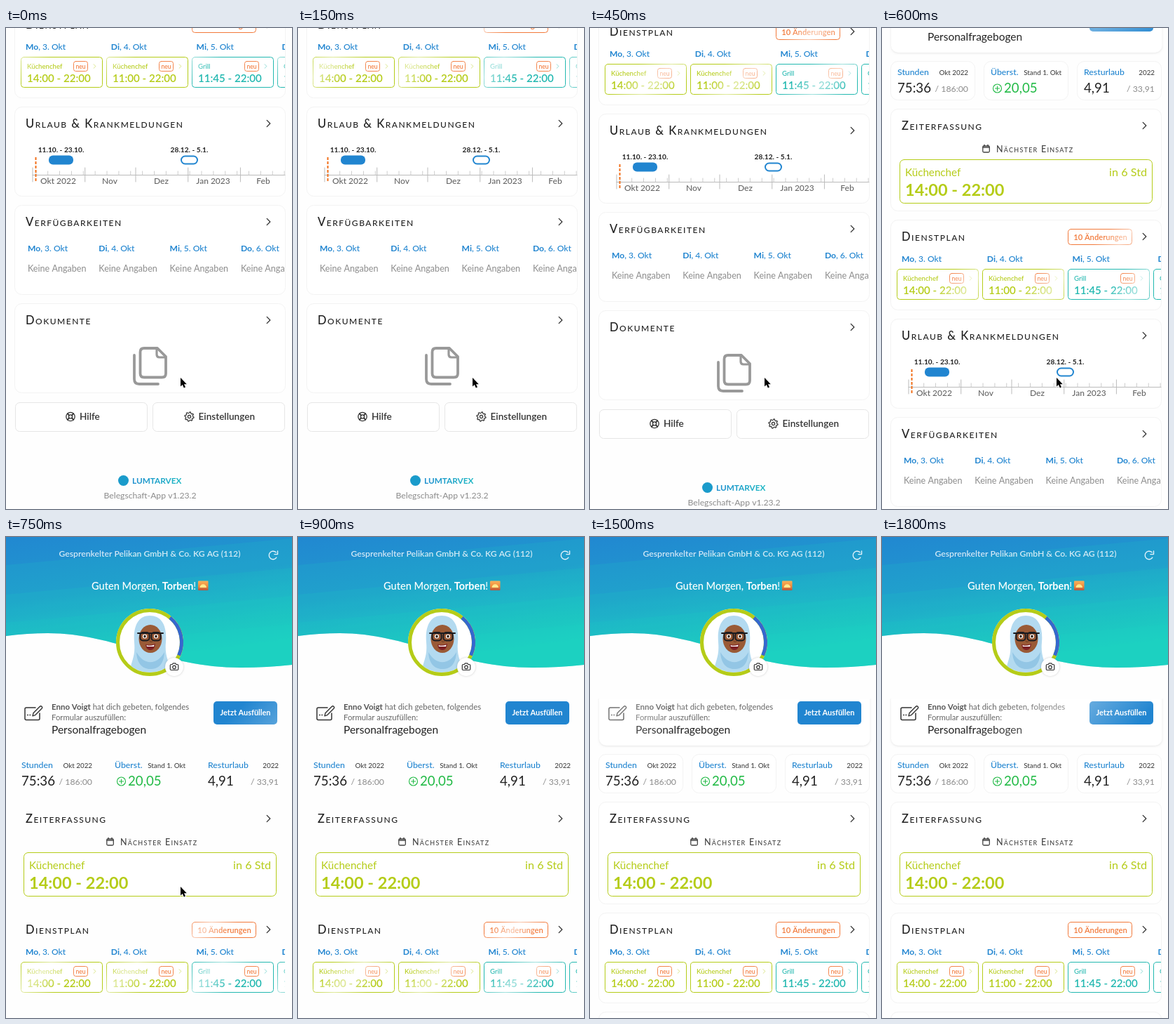
Recreate the animation shown at these times as an HTML page with a canvas. Size 408x685 px, loop 1900 ms.

```html
<!DOCTYPE html>
<html lang="de">
<head>
<meta charset="utf-8">
<title>Dienstplan</title>
<style>
  html, body { margin: 0; width: 100%; height: 100%; overflow: hidden; background: #fefefe; }
  canvas { display: block; width: 408px; height: 685px; }
</style>
</head>
<body>
<canvas id="stage"></canvas>
<script>
const W = 408, H = 685, LOOP = 1900, STEP = 150;
const BLUE = '#2185d0', LIME = '#b5cc18', TEAL = '#22b8b0', ORANGE = '#f2793a', GREEN = '#21ba45';
const DARK = '#222', GREY = '#8c8c8c';
const SCROLL = [564, 564, 564, 554, 262, 0];

const canvas = document.getElementById('stage');
const ctx = canvas.getContext('2d');
const dpr = window.devicePixelRatio || 1;
canvas.width = W * dpr;
canvas.height = H * dpr;

let time = 0, framed = true;

// y is the middle of the capital letters; returns the x where the text ends
function text(str, x, y, size, color, { weight = 400, align = 'left', spacing = 0, caps = '' } = {}) {
  ctx.font = `${caps} ${weight} ${size}px Lato, "Open Sans", sans-serif`;
  ctx.letterSpacing = spacing + 'px';
  ctx.textAlign = align;
  ctx.fillStyle = color;
  ctx.fillText(str, x, y + size * 0.36);
  return x + ctx.measureText(str).width;
}

function box(x, y, w, h, r, { fill, stroke, width = 1 } = {}) {
  ctx.beginPath();
  ctx.roundRect(x, y, w, h, r);
  if (fill) { ctx.fillStyle = fill; ctx.fill(); }
  if (stroke) { ctx.strokeStyle = stroke; ctx.lineWidth = width; ctx.stroke(); }
}

function line(d, color, width = 1) {
  ctx.strokeStyle = color;
  ctx.lineWidth = width;
  ctx.lineCap = ctx.lineJoin = 'round';
  ctx.stroke(new Path2D(d));
}

function shape(d, color) {
  ctx.fillStyle = color;
  ctx.fill(new Path2D(d));
}

function oval(x, y, rx, ry, color) {
  ctx.beginPath();
  ctx.ellipse(x, y, rx, ry, 0, 0, 7);
  ctx.fillStyle = color;
  ctx.fill();
}

function ring(x, y, r, color, width, from = 0, to = Math.PI * 2) {
  ctx.beginPath();
  ctx.arc(x, y, r, from, to);
  ctx.lineCap = 'butt';
  ctx.strokeStyle = color;
  ctx.lineWidth = width;
  ctx.stroke();
}

// fades a diagonal band at cx towards the background
function fade(x, y, w, h, cx, half, strength) {
  const cy = y + h / 2, d = half / 2;
  const g = ctx.createLinearGradient(cx - d, cy - d, cx + d, cy + d);
  g.addColorStop(0, 'rgba(255,255,255,0)');
  g.addColorStop(0.5, `rgba(255,255,255,${strength})`);
  g.addColorStop(1, 'rgba(255,255,255,0)');
  ctx.fillStyle = g;
  ctx.fillRect(x - 1, y - 1, w + 2, h + 2);
}

function shimmer(x, y, w, h) {
  const f = time < 750 ? 0.06 + (time - 150) * 0.0019 : 0.19 + (time - 750) * 0.0017;
  fade(x, y, w, h, x + f * w, w * 0.4, 0.58);
}

function card(x, y, w, h, r = 10) {
  if (framed) box(x + 0.5, y + 0.5, w - 1, h - 1, r, { fill: '#fff', stroke: '#f3f3f3' });
}

const chevron = (x, y, s, color, width) =>
  line(`M${x - s / 2} ${y - s}L${x + s / 2} ${y}L${x - s / 2} ${y + s}`, color, width);

function section(name, y, h) {
  card(12, y, 387, h);
  text(name, 28, y + 24.5, 16.5, DARK, { weight: 500, spacing: 1.5, caps: 'small-caps' });
  chevron(374.5, y + 24, 4.6, '#333', 1.3);
}

function day(name, date, x, y) {
  const end = text(name, x, y, 12.1, BLUE, { weight: 700 });
  text(`, ${date}. Okt`, end, y, 12.1, BLUE, { weight: 500 });
}

function clipRight(draw) {
  ctx.save();
  ctx.beginPath();
  ctx.rect(0, 0, 398, 1300);
  ctx.clip();
  draw();
  ctx.restore();
}

function header() {
  ctx.save();
  ctx.clip(new Path2D('M0 0H408V182Q372 186 335 186C225 186 155 137 60 137Q30 137 0 141Z'));
  const g = ctx.createLinearGradient(0, 0, 25, 195);
  g.addColorStop(0, '#2188d1');
  g.addColorStop(0.45, '#2199ce');
  g.addColorStop(1, '#1fcdc1');
  ctx.fillStyle = g;
  ctx.fillRect(0, 0, W, 200);
  for (const y of [40, 82, 122, 162])
    shape(`M0 ${y}L408 ${y - 38}V220H0Z`, 'rgba(29,209,191,0.12)');
  ctx.restore();

  text('Gesprenkelter Pelikan GmbH & Co. KG AG (112)', 205, 24, 12.2, 'rgba(255,255,255,0.8)',
    { weight: 600, align: 'center' });
  ring(381, 26, 5.8, '#e4f3fb', 1.4, 0.5, 5.6);
  line('M387.5 20V24.6H382.8', '#e4f3fb', 1.4);

  let x = text('Guten Morgen, ', 122, 69.5, 14.6, '#fff', { weight: 500 });
  x = text('Torben', x, 69.5, 14.4, '#fff', { weight: 700 });
  text('!', x, 69.5, 14.4, '#fff');
  const sky = ctx.createLinearGradient(0, 62, 0, 76);
  sky.addColorStop(0, '#f7b45c');
  sky.addColorStop(0.6, '#f08a3c');
  sky.addColorStop(1, '#b5533c');
  box(274, 62.5, 14.5, 13.5, 1, { fill: sky });
  shape('M276.5 72A4.7 4.7 0 0 1 286 72Z', '#ffe98c');
}

function avatar() {
  oval(205, 150, 48, 48, '#fff');
  ctx.save();
  ctx.beginPath();
  ctx.arc(205, 150, 43, 0, 7);
  ctx.clip();
  shape('M176 196C178 176 185 172 183 150C181 125 190 112 205 112C222 112 230 126 228 150C226 170 233 176 235 196Z', '#b3daf0');
  shape('M186 164C197 183 215 183 226 164C225 183 216 188 206 188C196 188 187 182 186 164Z', '#93c6e5');
  oval(206, 145, 16.5, 20, '#9a5a36');
  for (const ex of [198, 214]) {
    oval(ex, 141.5, 3, 3, '#fff');
    oval(ex, 141.5, 1.6, 1.9, '#2b1a12');
    box(ex - 6.6, 136, 13.2, 11.5, 4, { stroke: '#1c1c20', width: 2 });
  }
  line('M188 137H224', '#1c1c20', 2);
  line('M205 148Q207.5 151 209 148', '#6f4024', 1.2);
  shape('M199 153Q206 155 213 152Q212 161 206 161Q200 161 199 153Z', '#7c1f24');
  shape('M200.5 154Q206 156 211.5 153.4L211 156H201Z', '#fff');
  ctx.restore();
  ring(205, 150, 45.5, LIME, 5);
  ring(205, 150, 45.5, '#3567cf', 5, -0.88, 0.42);

  ctx.save();
  ctx.shadowColor = 'rgba(0,0,0,0.2)';
  ctx.shadowBlur = 3 * dpr;
  oval(240, 185, 13, 13, '#fff');
  ctx.restore();
  line('M235.5 181.5H237.3L238.3 179.8H241.7L242.7 181.5H244.5Q245.7 181.5 245.7 182.7V188.3Q245.7 189.5 244.5 189.5H235.5Q234.3 189.5 234.3 188.3V182.7Q234.3 181.5 235.5 181.5Z', '#333', 1.2);
  ring(240, 185.4, 2.2, '#333', 1.2);
}

function request() {
  if (framed) {
    ctx.save();
    ctx.beginPath();
    ctx.rect(0, 230, W, 80);
    ctx.clip();
    ctx.shadowColor = 'rgba(0,0,0,0.09)';
    ctx.shadowBlur = 3 * dpr;
    ctx.shadowOffsetY = dpr;
    box(13, 222, 386.5, 75, 10, { fill: '#fff' });
    ctx.restore();
  }
  line('M42 243H29Q27 243 27 245V258.5Q27 260.5 29 260.5H46Q48 260.5 48 258.5V251', '#333', 1.5);
  line('M38 254.8L39 250.8L48.2 241.4Q49.6 240 51 241.4Q52.4 242.8 51 244.2L41.8 253.6Z', '#333', 1.4);
  for (const x of [31, 34.3]) oval(x, 253.5, 0.9, 0.9, '#333');

  const x = text('Enno Voigt', 65, 242, 11.5, '#555', { weight: 700 });
  text(' hat dich gebeten, folgendes', x, 242, 11.4, '#666');
  text('Formular auszufüllen:', 65, 257, 11.3, '#666');
  text('Personalfragebogen', 65, 274, 15.5, DARK);
  box(296, 234, 91, 33, 5, { fill: BLUE });

  const start = time < 1050 ? 310 - 0.78 * 600 : 30 - 0.78 * 1500;
  fade(22, 232, 366, 52, start + 0.78 * time, 110, 0.34);
  text('Jetzt Ausfüllen', 341.5, 250.5, 10.9, '#fff', { weight: 700, align: 'center' });
}

function stat(x, name, note, value, rest, color = DARK, indent = 0) {
  card(x, 309, 121, 56);
  text(name, x + 10, 325, 12.3, BLUE, { weight: 500 });
  text(note, x + 111, 325, 9.8, '#444', { weight: 500, align: 'right' });
  text(value, x + 10 + indent, 347, 18.7, color);
  text(rest, x + 111, 349, 12.3, GREY, { align: 'right' });
}

function stats() {
  stat(12, 'Stunden', 'Okt 2022', '75:36', '/ 186:00');
  stat(145, 'Überst.', 'Stand 1. Okt', '20,05', '', GREEN, 19);
  stat(278, 'Resturlaub', '2022', '4,91', '/ 33,91');
  ring(164.5, 348, 6, GREEN, 1.1);
  line('M161.5 348H167.5M164.5 345V351', GREEN, 1.1);
}

function nextShift() {
  section('Zeiterfassung', 377, 146);
  box(143.8, 430, 9.5, 9, 1.5, { stroke: '#444', width: 1.3 });
  line('M144 432H153M146 428.5V430M151 428.5V430', '#444', 1.6);
  text('Nächster Einsatz', 163, 434.5, 12.5, '#444', { weight: 500, spacing: 1.25, caps: 'small-caps' });
  box(25.5, 449.5, 360, 62, 6, { fill: '#fff', stroke: LIME });
  text('Küchenchef', 33, 467.5, 15.2, LIME);
  text('in 6 Std', 378, 467.5, 16.2, LIME, { align: 'right' });
  text('14:00 - 22:00', 33, 493, 23.5, LIME, { weight: 700 });
}

function shift(x, role, hours, color) {
  box(x, 605.5, 116, 43, 4, { fill: '#fff', stroke: color });
  text(role, x + 8.5, 618.5, 9.6, color, { weight: 500 });
  box(x + 75, 611.5, 20, 14, 3, { stroke: ORANGE, width: 0.9 });
  text('neu', x + 85, 618.8, 8.6, ORANGE, { weight: 500, align: 'center' });
  ctx.globalAlpha = 0.5;
  chevron(x + 105, 618.5, 2.8, color, 1);
  ctx.globalAlpha = 1;
  text(hours, x + 8.5, 636, 15.1, color, { weight: 600 });
  shimmer(x, 605, 116, 44);
}

function roster() {
  section('Dienstplan', 535, 129);
  box(265.5, 548.5, 91, 22, 4, { fill: '#fff', stroke: ORANGE });
  text('10 Änderungen', 311.5, 559.5, 11.2, ORANGE, { weight: 600, align: 'center' });
  shimmer(265, 548, 92, 23);
  clipRight(() => {
    ['Mo', 'Di', 'Mi', 'Do'].forEach((d, i) => day(d, i + 3, 28 + i * 121.8, 591));
    shift(21.5, 'Küchenchef', '14:00 - 22:00', LIME);
    shift(143.5, 'Küchenchef', '11:00 - 22:00', LIME);
    shift(265.5, 'Grill', '11:45 - 22:00', TEAL);
    shift(387.5, 'Grill', '11:45 - 22:00', TEAL);
  });
}

function absences() {
  section('Urlaub & Krankmeldungen', 676, 128);
  const dayWidth = 2.41, start = 38;
  line(`M${start} 773.5H398`, '#bbb');
  for (let x = start + 2 * dayWidth; x < 398; x += 7 * dayWidth)
    line(`M${x} 768V773`, '#ccc');
  let x = start;
  for (const days of [31, 30, 31, 31, 28]) {
    line(`M${x} 763V783`, '#bbb');
    x += days * dayWidth;
  }
  [['Okt 2022', 74.5], ['Nov', 148], ['Dez', 221.5], ['Jan 2023', 295.5], ['Feb', 367]].forEach(([m, c]) =>
    text(m, c, 782, 12, '#666', { weight: 500, align: 'center' }));
  ctx.setLineDash([4, 2]);
  ctx.strokeStyle = '#f2711c';
  ctx.lineCap = 'butt';
  ctx.lineWidth = 2;
  ctx.beginPath();
  ctx.moveTo(42.5, 748);
  ctx.lineTo(42.5, 784);
  ctx.stroke();
  ctx.setLineDash([]);
  const bold = { weight: 700, align: 'center' };
  text('11.10. - 23.10.', 78.5, 737, 10.2, DARK, bold);
  text('28.12. - 5.1.', 261.5, 737, 10.2, DARK, bold);
  box(61, 745.5, 35, 13, 6, { fill: BLUE });
  box(250, 746.5, 23, 11, 5.5, { fill: '#fff', stroke: BLUE, width: 2 });
}

function availability() {
  section('Verfügbarkeiten', 816, 128);
  clipRight(() => ['Mo', 'Di', 'Mi', 'Do'].forEach((d, i) => {
    const x = 31 + i * 101.3;
    day(d, i + 3, x, 878);
    text('Keine Angaben', x, 906.5, 12.6, GREY);
  }));
}

function documents() {
  section('Dokumente', 956, 128);
  line('M216 1020H197Q191.5 1020 191.5 1025.5V1056Q191.5 1061.5 197 1061.5H222.5Q228 1061.5 228 1056V1032Z', '#999', 3.8);
  line('M215 1021V1029Q215 1033 219 1033H227', '#999', 3.2);
  line('M183 1030V1064Q183 1071 190 1071H217', '#999', 3.8);
}

function gear(cx, cy) {
  let d = '';
  for (let i = 0; i < 32; i++) {
    const a = (i + 0.5) / 32 * Math.PI * 2, r = i % 4 < 2 ? 6.6 : 5;
    d += `${i ? 'L' : 'M'}${cx + r * Math.cos(a)} ${cy + r * Math.sin(a)}`;
  }
  line(d + 'Z', '#333', 1.2);
  ring(cx, cy, 2.1, '#333', 1.2);
}

function footer() {
  for (const x of [13.5, 209.5]) box(x, 1097.5, 188, 41, 6, { fill: '#fff', stroke: '#e6e6e6' });
  ring(92, 1117.5, 6.2, '#333', 1.3);
  ring(92, 1117.5, 2.6, '#333', 1.3);
  for (let i = 0; i < 4; i++) {
    const a = Math.PI * (i / 2 + 0.25), c = Math.cos(a), s = Math.sin(a);
    line(`M${92 + 2.8 * c} ${1117.5 + 2.8 * s}L${92 + 6 * c} ${1117.5 + 6 * s}`, '#333', 1.8);
  }
  text('Hilfe', 105, 1117.5, 13.6, '#333', { weight: 600 });
  gear(261.5, 1117.5);
  text('Einstellungen', 274.5, 1117.5, 13.6, '#333', { weight: 600 });

  oval(167.5, 1208.5, 7.5, 7.5, '#1a9bcb');
  const g = ctx.createLinearGradient(180, 0, 253, 0);
  g.addColorStop(0, '#1e8fcf');
  g.addColorStop(1, '#1fb9c4');
  text('LUMTARVEX', 180, 1208.5, 11.8, g, { weight: 700 });
  text('Belegschaft-App v1.23.2', 205.5, 1230, 12.2, GREY, { align: 'center' });
}

function cursor() {
  const d = 'M249 498V510.5L251.8 508L253.8 512.6L256 511.6L254 507.2H257.8Z';
  line(d, '#fff', 2);
  shape(d, '#000');
}

function draw() {
  const step = Math.floor((performance.now() % LOOP) / STEP);
  time = step * STEP;
  framed = time < 750 || time >= 1050;
  ctx.setTransform(dpr, 0, 0, dpr, 0, 0);
  ctx.fillStyle = '#fefefe';
  ctx.fillRect(0, 0, W, H);
  ctx.translate(0, -(SCROLL[step] || 0));
  for (const part of [header, avatar, request, stats, nextShift, roster, absences, availability, documents, footer]) part();
  ctx.setTransform(dpr, 0, 0, dpr, 0, 0);
  if (time < 900) cursor();
  requestAnimationFrame(draw);
}
draw();
</script>
</body>
</html>
```
